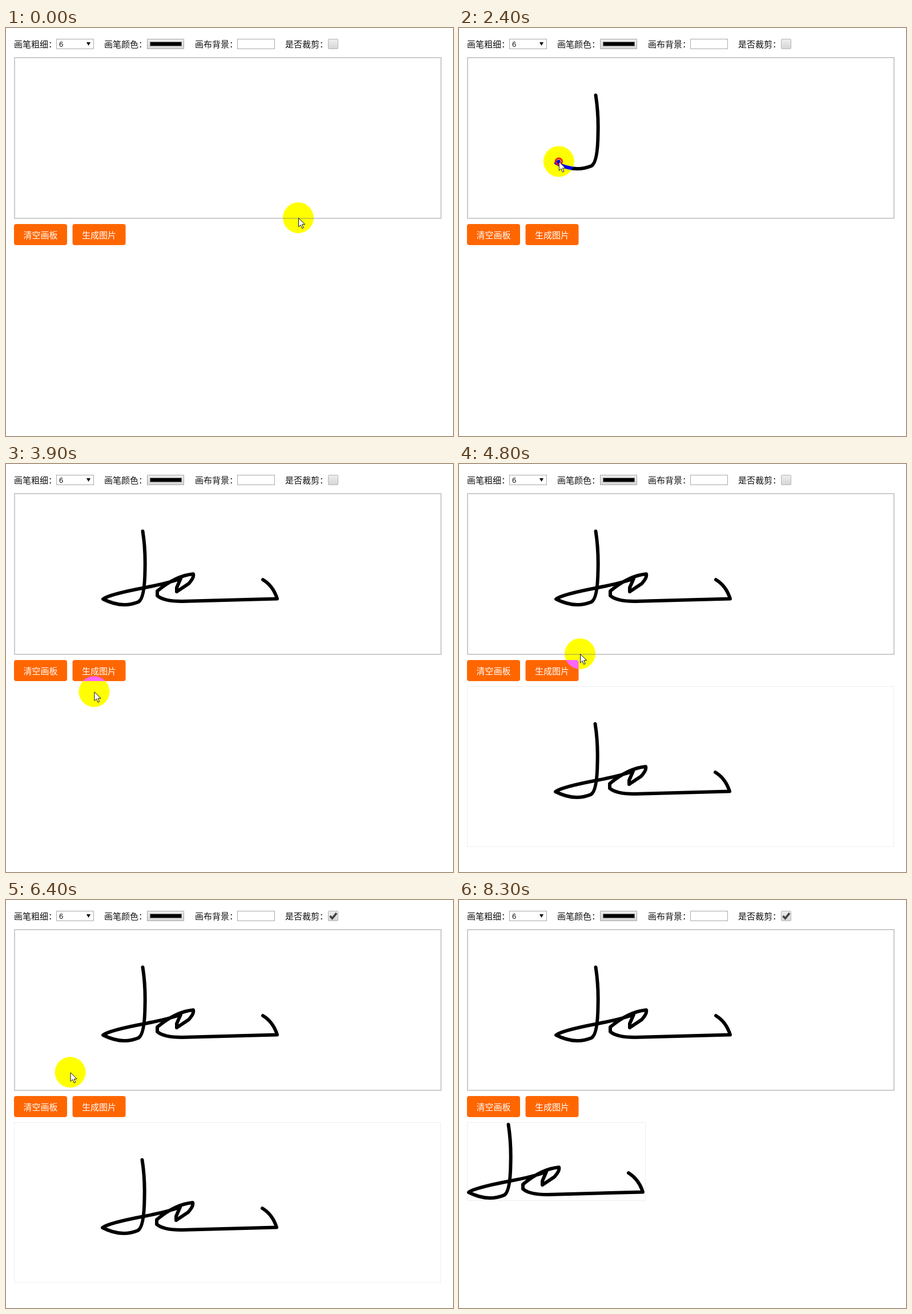
An HTML page that plays this animation: 783 by 716 pixels, repeating every 8.9 s.

```html
<!DOCTYPE html>
<html lang="zh-CN">
<head>
<meta charset="utf-8">
<title>画板</title>
<style>
  html, body { margin: 0; width: 100%; height: 100%; overflow: hidden; background: #fff; }
  svg { display: block; isolation: isolate; }
  text { font-family: "Noto Sans CJK SC", "Noto Sans CJK", sans-serif; font-size: 15px; fill: #111; }
  .button text { fill: #fff; }
  .button rect { fill: #ff6600; }
  .button.hover rect { fill: #ff4d00; }
  .field { fill: #fff; stroke: #a9a9a9; }
  .ink { fill: none; stroke: #000; stroke-width: 6; stroke-linecap: round; stroke-linejoin: round; }
  .frame { fill: #fff; stroke: #eee; }
  #halo { fill: #00f; mix-blend-mode: difference; }
</style>
</head>
<body>
<svg width="783" height="716" viewBox="0 0 783 716">
  <defs>
    <linearGradient id="grey" x2="0" y2="1">
      <stop stop-color="#eee"/><stop offset="1" stop-color="#d6d6d6"/>
    </linearGradient>
    <path id="stroke" class="ink" d="M239.5 118Q244.5 150 243.5 185Q243 236 232 242Q203 254 170 237
      Q180 229 243 217Q285 209 306 201L299 217V224L320 210Q330 199 328 193Q297 196 265 223V231
      Q276 241 308 241L475 236.5Q468 214 450 203"/>
  </defs>
  <rect width="783" height="716" fill="#fff"/>

  <text x="14" y="33.5">画笔粗细：</text>
  <rect class="field" x="88.5" y="19.5" width="65" height="17"/>
  <text x="93" y="33" style="font:13px 'Liberation Sans',sans-serif">6</text>
  <path d="M141 25h7l-3.5 6z"/>

  <text x="172" y="33.5">画笔颜色：</text>
  <rect x="247.5" y="19.5" width="64" height="17" fill="url(#grey)" stroke="#a9a9a9"/>
  <rect x="252.5" y="24.5" width="55" height="7" stroke="#777"/>

  <text x="331" y="33.5">画布背景：</text>
  <rect class="field" x="405.5" y="19.5" width="65" height="17"/>

  <text x="489" y="33.5">是否裁剪：</text>
  <rect x="564.5" y="19.5" width="17" height="17" rx="1.5" fill="url(#grey)" stroke="#b4b4b4"/>
  <path id="check" d="M567.5 28l4 4.3 7.5-9.3" fill="none" stroke="#444" stroke-width="3.6"/>

  <rect x="15" y="52" width="747" height="282" fill="#fff" stroke="#ccc" stroke-width="2"/>
  <use id="live" href="#stroke"/>

  <g class="button">
    <rect x="14" y="344" width="93" height="37" rx="4"/><text x="30.5" y="368.5">清空画板</text>
  </g>
  <g class="button">
    <rect x="116.5" y="344" width="93" height="37" rx="4"/><text x="133" y="368.5">生成图片</text>
  </g>

  <g id="full">
    <rect class="frame" x="14.5" y="390.5" width="747" height="281"/>
    <use href="#stroke" x="-1" y="338"/>
  </g>
  <g id="cropped">
    <rect class="frame" x="14.5" y="390.5" width="312" height="137"/>
    <use href="#stroke" x="-153" y="276"/>
  </g>

  <circle id="halo" r="27"/>
  <g id="pointer">
    <circle id="ring" r="5.5" fill="none" stroke="#f01020" stroke-width="3"/>
    <path d="M.5 .5v15.5l3.6-3.4 2.5 6 2.6-1.1-2.5-5.8h4.9z" fill="#fff" stroke="#111"/>
  </g>
</svg>
<script>
const LOOP = 8900, TICK = 100;
const PEN_DOWN = 2000, PEN_UP = 3200, SAVE = 4200, CHECK = 5600, CROP = 7300;

const $ = id => document.getElementById(id);
const stroke = $('stroke'), live = $('live');
const strokeLength = stroke.getTotalLength();
const buttons = [...document.querySelectorAll('.button')];

// The pointer follows each path from start to end and rests in between.
function leg(start, end, d) {
  const path = document.createElementNS('http://www.w3.org/2000/svg', 'path');
  path.setAttribute('d', d);
  return { start, end, path };
}

const LEGS = [
  leg(200, 1100, 'M512 333Q440 355 400 280Q350 190 225 131'),
  leg(1100, 1500, 'M225 131Q198 165 250 128'),
  leg(1500, PEN_DOWN, 'M250 128Q270 90 239 118'),
  leg(PEN_UP, 3800, 'M450 203Q400 260 330 300T165 412'),
  leg(3800, 4300, 'M165 412Q110 350 161 363'),
  leg(4700, 4800, 'M161 363L212 333'),
  leg(4800, CHECK, 'M212 333Q420 290 460 120Q500 60 570.5 27'),
  leg(5700, 6500, 'M570.5 27Q520 70 375 130Q100 270 71 366'),
  leg(6500, 7100, 'M71 366L155 360'),
  leg(7100, CROP, 'M155 360L131 362'),
  leg(7600, 8300, 'M131 362Q170 600 420 650Q540 680 570 770')
];

const progress = (t, start, end) => Math.min(1, Math.max(0, (t - start) / (end - start)));

function pointerAt(t, inked) {
  if (t >= PEN_DOWN && t <= PEN_UP) return stroke.getPointAtLength(inked);
  const { start, end, path } = LEGS.findLast(l => l.start <= t) || LEGS[0];
  return path.getPointAtLength(progress(t, start, end) * path.getTotalLength());
}

function show(el, on) {
  el.style.display = on ? '' : 'none';
}

function render(t) {
  const inked = progress(t, PEN_DOWN, PEN_UP) ** 1.2 * strokeLength;
  const { x, y } = pointerAt(t, inked);

  show(live, t >= PEN_DOWN);
  live.style.strokeDasharray = t < PEN_UP ? `${Math.max(inked, .1)} 9999` : 'none';
  show($('full'), t >= SAVE && t < CROP);
  show($('cropped'), t >= CROP);
  show($('check'), t >= CHECK);
  show($('ring'), t >= PEN_DOWN && t <= PEN_UP);

  for (const b of buttons) {
    const r = b.firstElementChild.getBBox();
    b.classList.toggle('hover', x >= r.x && x <= r.x + r.width && y >= r.y && y <= r.y + r.height);
  }
  for (const id of ['halo', 'pointer']) $(id).setAttribute('transform', `translate(${x} ${y})`);
}

const began = performance.now();
function loop() {
  const t = (performance.now() - began) % LOOP;
  render(Math.floor(t / TICK) * TICK);
  requestAnimationFrame(loop);
}
loop();
</script>
</body>
</html>
```
